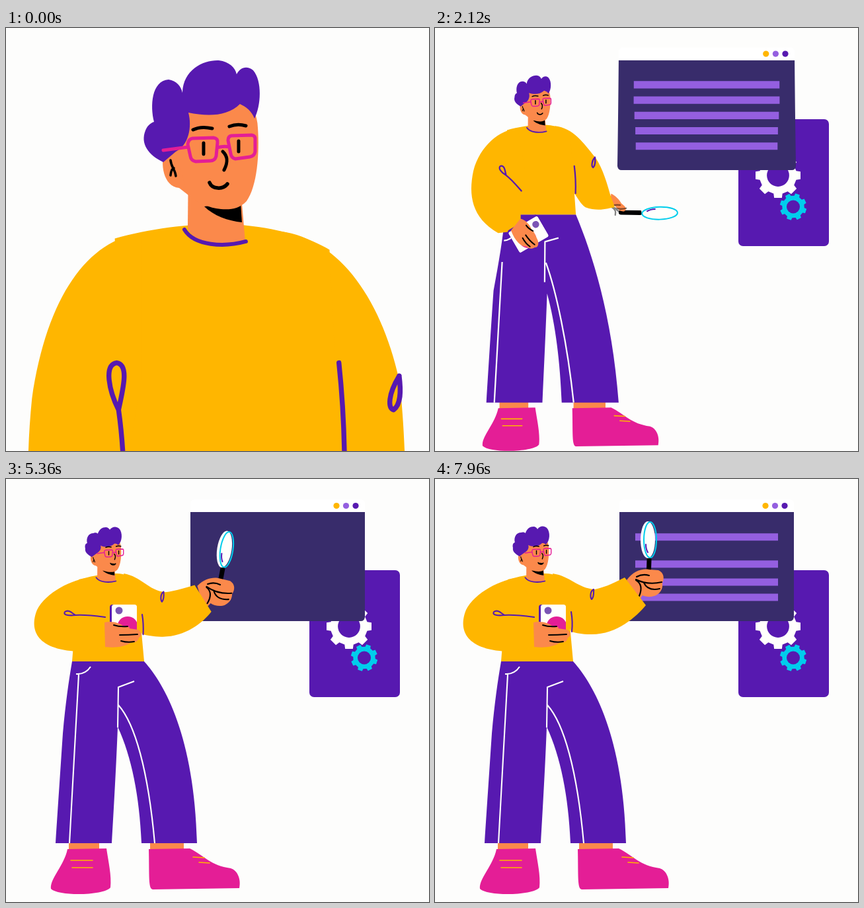
Animation of 640 by 640 pixels, one loop 8 s. Source, as an HTML page with a canvas:

```html
<!DOCTYPE html>
<html lang="en">
<head>
<meta charset="utf-8">
<style>
  html, body { margin: 0; width: 100%; height: 100%; overflow: hidden; background: #fdfdfc; }
  canvas { display: block; width: 100vmin; height: 100vmin; }
</style>
</head>
<body>
<canvas id="stage" width="640" height="640"></canvas>
<script>
const LOOP = 8000;
const PURPLE = '#5719b0', YELLOW = '#ffb600', SKIN = '#fb894b', PINK = '#e41e96', CYAN = '#00cdec',
      DARK = '#382c6b', LILAC = '#945fe0', WHITE = '#fffffc', BLACK = '#000', PAPER = '#fdfdfc';
const ctx = document.getElementById('stage').getContext('2d');

const lerp = (a, b, k) => a + (b - a) * k;
const span = (t, from, to) => Math.min(1, Math.max(0, (t - from) / (to - from)));
const sine = u => (1 - Math.cos(Math.PI * u)) / 2;
const backOut = (u, c) => u <= 0 ? 0 : 1 + (c + 1) * (u - 1) ** 3 + c * (u - 1) ** 2;

// Blends two paths with equal commands, number by number.
const NUMBER = /-?\d+(\.\d+)?/g;
function blend(a, b, k, map = n => n) {
  const end = b.match(NUMBER);
  let i = 0;
  return a.replace(NUMBER, n => lerp(map(+n), +end[i++], k).toFixed(3));
}
function fill(path, color) {
  ctx.fillStyle = color;
  ctx.fill(new Path2D(path));
}
function line(path, color, width) {
  ctx.strokeStyle = color;
  ctx.lineWidth = width;
  ctx.stroke(new Path2D(path));
}
function oval(x, y, rx, ry, color) {
  ctx.fillStyle = color;
  ctx.beginPath();
  ctx.ellipse(x, y, rx, ry, 0, 0, 7);
  ctx.fill();
}
function box(x, y, w, h, r, color) {
  ctx.fillStyle = color;
  ctx.beginPath();
  ctx.roundRect(x, y, w, h, r);
  ctx.fill();
}
function group(draw) {
  ctx.save();
  draw();
  ctx.restore();
}

function gear(x, y, r, turn, color) {
  ctx.fillStyle = color;
  ctx.beginPath();
  for (let i = 0; i < 8; i++) {
    const a = turn + i * Math.PI / 4;
    for (const [da, k] of [[-0.24, 0.82], [-0.17, 1], [0.17, 1], [0.24, 0.82]])
      ctx.lineTo(x + r * k * Math.cos(a + da), y + r * k * Math.sin(a + da));
  }
  ctx.closePath();
  ctx.fill();
  oval(x, y, r * 0.49, r * 0.49, PURPLE);
}

function card(t) {
  const k = backOut(span(t, 529, 1212), 3.4);
  if (k <= 0) return;
  group(() => {
    ctx.translate(459, 330);
    ctx.scale(k, k);
    box(0, -192, 137, 192, 7, PURPLE);
    gear(60, -107, 34.5, 0, WHITE);
    gear(83, -59.5, 20.5, 0.33, CYAN);
  });
}

// Lines leave upwards one by one and come back from below.
function scrollOffset(t, i) {
  const run = start => sine(span(t, start + i * 100, start + i * 100 + 760));
  if (t > 7500) return -175 * run(7685);
  return t < 5480 ? -175 * run(3685) : 175 * (1 - run(5520));
}

function browser(t) {
  const grow = delay => backOut(span(t - delay, 976, 2276), 0.8);
  const h = grow(0);
  if (h <= 0) return;
  const mid = 411, floor = 215, wt = 132 * h, wb = 132 * Math.max(0, grow(200));
  const y = v => floor - (floor - v) * h;
  const mw = lerp(wt, wb, 0.4), r = 6 * h;
  fill(`M${mid - wt} ${y(50)} L${mid + wt} ${y(50)}
    Q${mid + mw} ${y(140)} ${mid + wb} ${floor - r} Q${mid + wb - 1} ${floor} ${mid + wb - r} ${floor}
    L${mid - wb + r} ${floor} Q${mid - wb + 1} ${floor} ${mid - wb} ${floor - r}
    Q${mid - mw} ${y(140)} ${mid - wt} ${y(50)}Z`, DARK);
  group(() => {
    ctx.beginPath();
    ctx.rect(270, y(50), 290, floor - y(50));
    ctx.clip();
    for (let i = 0; i < 5; i++) {
      const q = Math.max(0, grow(445 - 300 * (1 - i / 4) ** 2));
      const cy = y(87 + i * 23 + scrollOffset(t, i));
      box(mid - 108 * q, cy - 5.5 * q, 216 * q, 11 * q, 0, LILAC);
    }
  });
  box(mid - wt, y(31), wt * 2, 19 * h, [r, r, 0, 0], '#fff');
  [YELLOW, LILAC, PURPLE].forEach((c, i) =>
    oval(mid + (89 + i * 14.5) * h, y(40.5), 4.6 * h, 4.6 * h, c));
}

function head(s, k, dip) {
  const g = s / 2.85, origin = 82 - 82 * g;
  ctx.translate(lerp(origin, 50.1, k), lerp(origin, 57.6, k));
  ctx.scale(lerp(g, 0.32, k), lerp(g, 0.3, k));
  fill('M276 200 L275 303 C287 330 330 332 362 323 L354 230Z', SKIN);
  line('M270 305 C285 330 330 332 363 323', PURPLE, 6);
  fill('M300 270 L355 264 L357 294 C336 292 314 284 300 270Z', BLACK);

  ctx.translate(12 * dip, 6 * dip);
  fill('M240 185 C233 205 238 240 262 242 L280 256 L284 180Z', SKIN);
  fill('M262 110 L360 100 Q380 125 381 150 C384 190 380 240 364 262 C352 275 335 276 318 273 C302 270 285 262 276 253 L255 187Z', SKIN);
  fill(blend('M224 142 C218 118 220 80 246 78 C258 80 265 88 267 98 C268 62 300 48 322 49 C338 51 347 60 349 70 C354 60 364 56 374 64 C388 80 386 118 376 137 C372 126 363 119 354 115 C335 134 305 134 276 128 C282 150 276 178 257 187 L238 203 C215 192 203 175 211 155 C214 148 218 144 224 142Z',
    'M221 128 C215 101 228 78 250 78 C256 75 265 75 271 81 C278 58 293 48 309 48 C318 48 325 55 328 61 C337 45 359 41 372 55 C390 75 387 121 368 138 C364 133 357 131 350 131 C331 151 303 151 284 141 C290 155 281 171 268 178 L243 198 C225 188 209 175 212 155 C209 141 212 131 221 128Z', k), PURPLE);
  line('M249 200 C250 211 256 214 257 224 M249 223 Q250 213 254 212', BLACK, 3.5);

  // The face slides towards the right as the head turns.
  ctx.translate(57 * k, -4 * k);
  ctx.scale(lerp(1, 0.89, k), 1);
  line('M283 154 Q295 148 312 152 M338 149 Q350 144 363 148 M299 174 L299 191 M352 171 L352 187 M328 187 C338 196 334 207 330 215', BLACK, 5);
  line('M282 167 L314 166 Q321 167 320 174 L318 194 Q316 201 309 201 L287 202 Q280 201 279 194 L275 176 Q276 168 282 167Z M341 163 L372 162 Q378 163 377 170 L377 187 Q376 194 369 195 L347 198 Q341 197 340 190 L336 170 Q336 164 341 163Z M320 181 Q329 178 338 180 M276 180 L238 185', PINK, 5);
  const smile = 'M308 234 C312 244 328 245 335 236';
  line(smile, BLACK, 5.5);
  if (k > 0.5) fill(smile + 'Z', BLACK);
}

function person(t) {
  const u = span(t, 0, 1620);
  const s = lerp(2.85, 0.9, (u + sine(u)) / 2);
  const k = sine(span(t, 1660, 2600));
  const dip = sine(span(t, 4900, 5800)) - sine(span(t, 6700, 7560));
  const zoom = n => 82 + s * (n - 82);
  const pose = (a, b) => blend(a, b, k, zoom);
  const place = (ax, ay, bx, by, turn = 0, size = 1) => {
    ctx.translate(lerp(zoom(ax), bx, k), lerp(zoom(ay), by, k));
    ctx.rotate(turn * Math.PI / 180 * (1 - k));
    ctx.scale(lerp(s * size, 1, k), lerp(s * size, 1, k));
  };
  const thin = lerp(2.6 * s, 2.1, k);

  // Raised arm with the magnifier
  group(() => {
    ctx.translate(322 - 3 * dip, 157 + 26 * dip);
    ctx.rotate(17 * Math.PI / 180 * dip);
    ctx.translate(-322, -157);
    group(() => {
      place(248, 427, 322, 157, 172, 1.1);
      line('M2 -35 L1 -6', BLACK, 7);
      oval(0, -65, 11, 28, WHITE);
      ctx.strokeStyle = CYAN;
      ctx.lineWidth = 2;
      ctx.beginPath();
      ctx.ellipse(3.5, -65, 9.5, 27, 0, 0, 7);
      ctx.stroke();
      line('M-3 -58 Q-3 -51 0 -46', PURPLE, 2);
    });
    fill(pose('M262 372 C263 390 264 410 260 420 L256 428 C254 432 250 430 248 426 C246 420 244 410 244 405 C243 395 243 385 243 380 L243 372Z',
      'M290 153 C300 139 314 135 324 137 L338 138 C347 142 347 151 344 157 C345 165 342 171 336 175 C330 179 320 179 314 176 L306 187Z'), SKIN);
    ctx.globalAlpha = k;
    line(pose('M250 416 Q253 417 256 416 M250 416 Q253 417 256 416 M250 416 Q253 417 256 416 M250 416 Q253 417 256 416',
      'M305 148 Q314 143 324 146 M304 152 Q322 161 343 156 M316 157 Q322 170 340 166 M304 153 Q316 160 309 177'), BLACK, thin);
  });
  const raised = 'M178 143 C205 147 215 165 242 167 C260 163 275 155 287 149 L319 191 C305 208 275 236 235 235 C222 235 214 233 206 231 L190 190Z';
  const lowered = 'M178 143 C205 148 215 172 240 175 C255 175 270 173 284 171 L303 210 C290 228 265 243 235 242 C222 241 214 240 206 238 L190 190Z';
  fill(pose('M196 161 C228 163 252 195 262 240 C267 280 266 340 262 377 L244 376 C240 360 238 345 236 330 C234 320 232 300 231 290 L200 200Z',
    blend(raised, lowered, dip)), YELLOW);

  // Feet
  group(() => {
    place(125, 637, 118, 551);
    box(-23, -2, 46, 13, 0, SKIN);
    fill('M-25 9 L34 8 C37 29 42 49 40 67 C32 79 -38 81 -50 69 C-52 54 -30 34 -25 9Z', PINK);
    line('M-20 26 L13 26 M-18 37 L13 37', YELLOW, 1.6);
  });
  group(() => {
    place(240, 637, 243, 551);
    box(-25, -2, 51, 13, 0, SKIN);
    fill('M-27 9 L35 8 C57 19 67 34 97 38 C107 41 113 54 110 68 L-21 70 C-28 69 -26 49 -27 9Z', PINK);
    line('M40 21 L57 22 M49 29 L65 30', YELLOW, 1.6);
  });

  // Trousers
  fill(pose('M115 311 L232 311 C252 400 271 520 288 637 L190 637 C188 580 186 520 180 465 C178 520 176 580 174 637 L80 637 C84 570 88 500 92 445 C105 400 113 360 115 311Z',
    'M100 276 L209 276 C240 310 285 390 289 551 L205 551 C202 480 190 420 169 375 C167 430 163 500 160 551 L75 551 C79 490 83 430 86 385 C90 340 95 305 100 276Z'), PURPLE);
  ctx.lineCap = 'butt';
  line(pose('M191 356 L172 359 L172 427 M175 399 C182 460 198 560 208 637 M95 445 L84 637 M113 370 Q110 375 105 376',
    'M194 306 L170 315 L169 376 M170 342 C195 370 215 440 225 551 M110 296 L96 551 M128 284 Q120 296 106 295'), WHITE, thin);
  ctx.lineCap = 'round';

  // Jumper
  fill(pose('M111 165 C135 158 165 156 180 158 C200 160 215 165 225 171 L232 311 L115 311Z',
    'M110 152 C125 148 150 142 168 143 C180 143 190 148 198 156 L209 276 L100 276Z'), YELLOW);
  fill(pose('M125 162 C97 166 75 195 67 250 C62 300 66 340 82 387 L114 385 L115 300 L125 240Z',
    'M130 149 C100 151 60 172 47 198 C36 225 42 258 110 261 L150 255 L148 216 L152 205Z'), YELLOW);
  line(pose('M113 256 C108 246 105 232 112 231 C119 232 115 246 113 256 C115 270 116 288 116 304',
    'M105 206 C95 207 86 206 89 201 C95 197 100 203 105 206 C120 205 135 207 150 209'), PURPLE, thin);
  line(pose('M230 231 C232 250 233 270 233 289',
    blend('M206 201 C208 212 208 222 207 231', 'M206 209 C208 220 208 230 208 239', dip)), PURPLE, thin);
  line(pose('M262 238 C256 248 256 255 259 256 C263 253 263 246 262 238',
    blend('M240 167 C234 170 235 180 237 182 C241 178 240 172 240 167', 'M237 174 C232 178 233 187 235 189 C238 186 238 180 237 174', dip)), PURPLE, thin);

  group(() => head(s, k, dip));

  // Phone and the hand that holds it
  group(() => {
    place(123, 436, 178, 209, 116);
    box(-21, -19, 40, 54, 4, PURPLE);
    ctx.beginPath();
    ctx.roundRect(-18, -19, 38, 54, 3);
    ctx.clip();
    box(-18, -19, 38, 54, 3, WHITE);
    oval(-7, -10, 5.5, 5.5, '#7b55b4');
    oval(6, 13, 15, 14, PINK);
  });
  fill(pose('M82 386 L114 386 C124 395 124 410 122 420 C120 425 118 422 117 416 L117 445 C116 455 110 460 106 456 C98 456 92 452 92 446 C84 440 80 420 82 386Z',
    'M150 254 L149 217 C160 214 172 218 177 222 C185 224 190 224 186 226 L200 228 C206 232 206 238 201 240 C200 246 195 248 190 247 C180 254 165 256 150 254Z'), SKIN);
  line(pose('M118 404 Q116 412 118 420 M95 420 Q94 435 98 447 M107 420 Q107 440 108 452',
    'M163 221 Q172 224 184 223 M174 245 Q184 248 194 246 M172 236 Q185 236 199 235'), BLACK, thin * 0.9);
}

function frame() {
  const t = performance.now() % LOOP;
  ctx.fillStyle = PAPER;
  ctx.fillRect(0, 0, 640, 640);
  ctx.lineCap = ctx.lineJoin = 'round';
  card(t);
  browser(t);
  person(t);
  requestAnimationFrame(frame);
}
frame();
</script>
</body>
</html>
```
